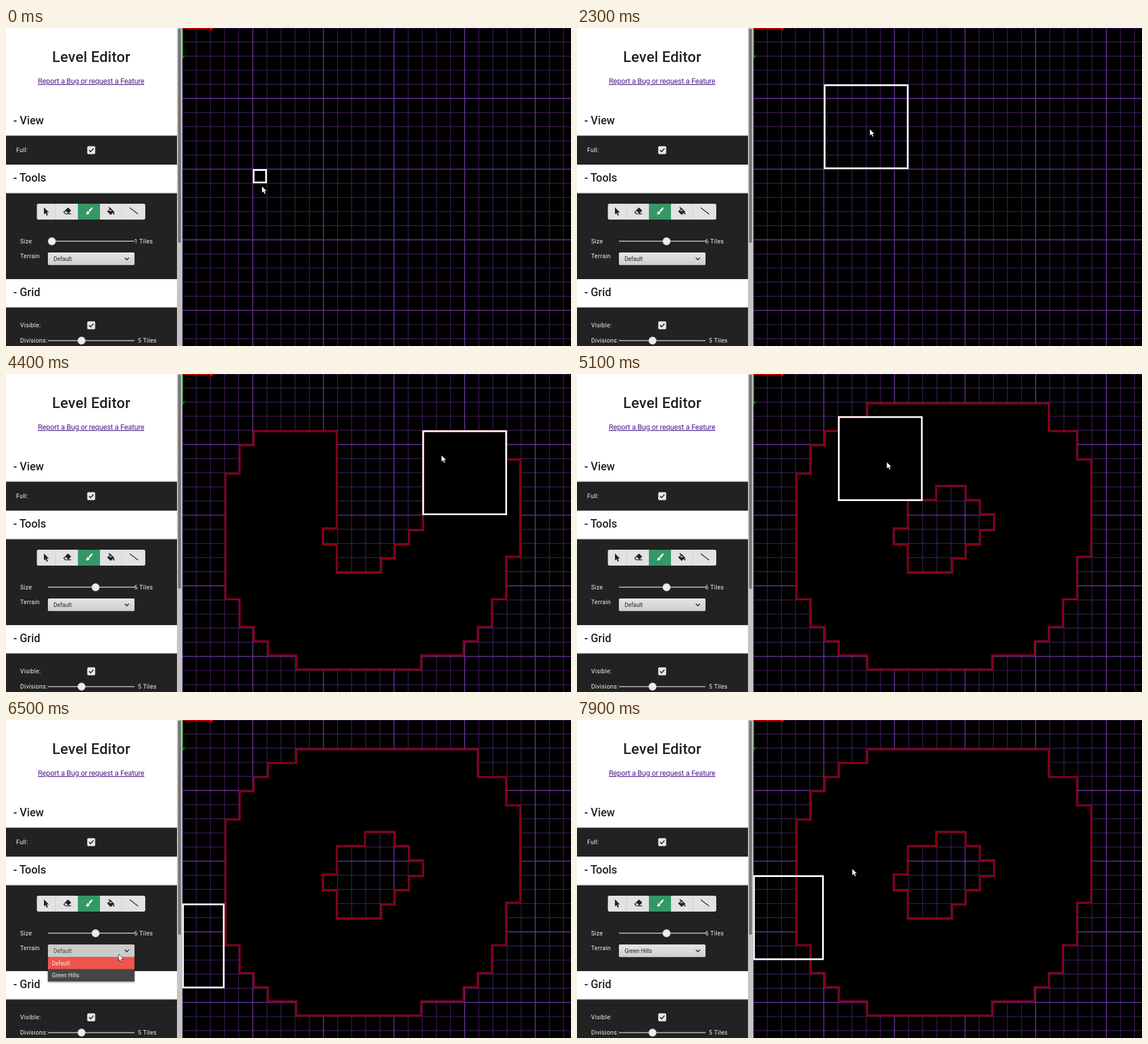
Recreate the animation shown at these times as an HTML page with a canvas. Size 998 by 561 pixels, loop 8000 ms.

```html
<!DOCTYPE html>
<html lang="en">
<head>
<meta charset="utf-8">
<title>Level Editor</title>
<style>
html, body { margin: 0; width: 100%; height: 100%; overflow: hidden; background: #000; }
canvas, svg { position: absolute; left: 0; top: 0; width: 998px; height: 561px; }
text { font-family: Roboto, sans-serif; fill: #222; }
.title { font-size: 26px; font-weight: 500; letter-spacing: .2px; text-anchor: middle; }
.link { font-size: 13px; letter-spacing: -.17px; text-anchor: middle; fill: #4c1788; text-decoration: underline; }
.head text { font-size: 19.5px; font-weight: 500; }
.label text { font-size: 10.5px; letter-spacing: .35px; fill: #f4f4f4; }
.small { font-size: 10px; }
.menu text { fill: #eee; }
.dark { fill: #222; }
.line { fill: none; stroke: #222; stroke-width: 1.7; }
.track { fill: #b4b4b4; }
.knob { fill: #ececec; stroke: #aaa; stroke-width: .6; }
</style>
</head>
<body>
<canvas id="stage" width="998" height="561"></canvas>
<svg viewBox="0 0 998 561">
  <defs>
    <linearGradient id="shade" x2="0" y2="1">
      <stop stop-color="#e6e6e6"/><stop offset="1" stop-color="#cdcdcd"/>
    </linearGradient>
    <linearGradient id="lit" x2="0" y2="1">
      <stop stop-color="#f0f0f0"/><stop offset="1" stop-color="#dadada"/>
    </linearGradient>
    <filter id="drop" x="-10%" y="-10%" width="120%" height="130%">
      <feDropShadow dx="0" dy="1.5" stdDeviation="1.8" flood-opacity=".5"/>
    </filter>
    <g id="box">
      <rect width="14" height="14" rx="2" fill="#e8e8e8"/>
      <path class="line" stroke-width="2" d="M3.2 6.8 6 9.7 11 4"/>
    </g>
  </defs>

  <rect width="302" height="561" fill="#fff"/>
  <rect x="302" width="9.5" height="561" fill="#c4c4c4"/>
  <rect x="304" y="1" width="5" height="378" rx="2.5" fill="#777"/>
  <path class="dark" d="M0 190H302V241H0ZM0 291H302V443H0ZM0 492H302V561H0Z"/>
  <rect id="gridHead" y="443" width="302" height="49" fill="#fff"/>
  <path d="M0 189.5H302M0 291H302M0 492.5H302" stroke="#ccc" stroke-width="1.5"/>

  <text class="title" x="150.5" y="59.5">Level Editor</text>
  <text class="link" x="150.3" y="98">Report a Bug or request a Feature</text>
  <g class="head">
    <text x="13" y="169.5">- View</text>
    <text x="13" y="271">- Tools</text>
    <text x="13" y="473">- Grid</text>
  </g>

  <g class="label">
    <text x="18" y="219">Full:</text>
    <text x="25" y="380">Size</text>
    <text x="25" y="406">Terrain</text>
    <text x="25" y="528">Visible:</text>
    <text x="25" y="555">Divisions:</text>
    <text x="233" y="555">5 Tiles</text>
    <text id="sizeText" x="226.5" y="380">1 Tiles</text>
  </g>
  <use href="#box" x="143.5" y="208.5"/>
  <use href="#box" x="143.5" y="517.5"/>

  <rect x="54.5" y="310" width="191.5" height="28" rx="3" fill="#e2e2e2"/>
  <rect x="127" y="310" width="39" height="28" fill="#349866"/>
  <path d="M87.5 310V338M204.5 310V338" stroke="#cfcfcf"/>
  <path class="dark" d="M67 316.5V328.8L69.8 326.4 71.9 331 74 330 72 325.6H75.8Z"/>
  <path class="dark" d="M101.5 324.5 108.5 317.5Q109.5 316.5 110.5 317.5L114.3 321.2Q115.2 322.2 114.3 323.2L110.2 327H115V328.5H105L101.5 325.8Z"/>
  <path d="M105.3 322.6 109.5 326.8 108.3 327.2H105.6L103.2 325Z" fill="#e2e2e2"/>
  <path d="M151.5 316.5Q153.6 316.4 152.8 318.4L148.3 324.6 145.6 322.3ZM144.8 323.1 147.4 325.5Q147.2 329.6 140.6 328.7 142.2 328 142.2 326 142.5 323.5 144.8 323.1Z" fill="#fff"/>
  <path class="line" d="M181.5 316.5 190 324 184.8 328.5 179.8 323.5 185.8 318.4"/>
  <path class="dark" d="M180 323H190L184.8 328.5ZM190.3 324.5Q193 329 190.3 329 188 329 190.3 324.5Z"/>
  <path class="line" style="stroke-width:1.4" d="M218.5 317 233.5 328.5"/>

  <rect class="track" x="74" y="375.2" width="153" height="1.8"/>
  <circle id="knob" class="knob" cx="81" cy="376.3" r="6.8"/>
  <rect class="track" x="74" y="550.6" width="153" height="1.8"/>
  <circle class="knob" cx="133.4" cy="551.5" r="6.8"/>

  <rect id="select" x="74" y="396" width="153" height="22.3" rx="2" fill="url(#shade)"/>
  <text id="choice" class="small" x="84" y="410.8">Default</text>
  <path class="line" style="stroke-width:1.5" d="M209.8 405.2 213.5 408.9 217.2 405.2"/>
  <g id="menu" class="menu" display="none">
    <rect x="74" y="418" width="153" height="43" fill="#444" filter="url(#drop)"/>
    <rect id="mark" x="74" y="418" width="153" height="21.5" fill="#f0544a"/>
    <text class="small" x="81" y="432.5">Default</text>
    <text class="small" x="81" y="454">Green Hills</text>
  </g>
  <path id="cursor" d="M0 0V12.2L2.8 9.7 4.8 14.2 7 13.2 5 8.9H8.7Z" fill="#fff" stroke="#000" stroke-width=".7"/>
</svg>

<script>
const $ = id => document.getElementById(id);
const stage = $('stage').getContext('2d');
const layer = document.createElement('canvas');
layer.width = 998;
layer.height = 561;
const land = layer.getContext('2d');

const TICK = 100, LOOP = 80, COLS = 28, ROWS = 23, DRAG = 30;
const X = c => 311.2 + 24.95 * c;
const Y = r => 24.93 * r - .3;

// Brush stamps (column,row) laid down in each tick of the drag
const drag = [
  '5,4 5,5 4,5', '4,6 3,7', '3,9 3,10', '4,11 4,12', '5,12 5,13 6,14', '7,14 8,15',
  '9,15 10,14', '10,15 11,15', '12,14 14,14', '14,13 15,13 15,12', '16,12 16,11',
  '17,10 17,8', '18,7', '18,6', '17,5 17,4', '16,4 15,3 15,2', '14,2 13,2',
  '12,2 11,2', '10,2 9,2', '8,2', '7,3', '6,3'
].map(s => s.split(' ').map(p => p.split(',').map(Number)));

// Brush moves without painting: tick, column, row
const hover = [
  [0, 5, 10], [1, 5, 11], [10, 3, 9], [19, 4, 8], [20, 5, 7], [21, 6, 6], [22, 6, 4], [23, 5, 4],
  [53, 5, 4], [54, 4, 5], [55, 3, 7], [56, 1, 8], [57, 0, 9], [58, -1, 11], [59, -2, 12],
  [60, -3, 13], [78, -2, 12], [79, -1, 11]
];

// Pointer rests: first tick, last tick, x, y
const rests = [
  [0, 0, 452, 279], [1, 1, 449, 284], [23, 29, 517, 178], [35, 35, 640, 437],
  [44, 44, 769, 143], [51, 52, 547, 155], [62, 68, 199, 413], [69, 69, 199, 422],
  [70, 70, 199, 434], [71, 71, 199, 445], [72, 77, 199, 451], [79, 79, 486, 262]
];

const sizeAt = n => Math.min(6, Math.max(1, n - 4));

function brushAt(n) {
  const size = sizeAt(n);
  if (n > 1 && n < 11) {
    const back = size - 1 >> 1;
    return [5 - back, 11 - back];
  }
  if (n >= DRAG && n < 53) return drag[Math.min(n - DRAG, drag.length - 1)].at(-1);
  return hover.findLast(h => h[0] <= n).slice(1);
}

function pointerAt(n) {
  const rest = rests.find(r => n >= r[0] && n <= r[1]);
  if (rest) return rest.slice(2);
  if (n < 19 || n > 59 && n < 78) return null;
  const [c, r] = brushAt(n + 1);
  return [X(c + 3.3), Y(r + 3.3)];
}

function drawGrid() {
  stage.fillStyle = '#000';
  stage.fillRect(0, 0, 998, 561);
  for (const major of [false, true]) {
    stage.strokeStyle = major ? '#663399' : '#3f2060';
    stage.lineWidth = major ? 1.6 : 1.2;
    stage.beginPath();
    for (let i = 0; i < COLS; i++) {
      if ((i % 5 === 0) !== major) continue;
      stage.moveTo(X(i), 0);
      stage.lineTo(X(i), 561);
      stage.moveTo(311, Y(i));
      stage.lineTo(998, Y(i));
    }
    stage.stroke();
  }
  stage.fillStyle = '#f00';
  stage.fill(new Path2D('M311 0H367L361 5.5V1.5H311Z'));
  stage.fillStyle = '#0a7a1a';
  stage.fill(new Path2D('M311 0H313V48.5H317L312 54.5H311Z'));
}

function drawLand(n) {
  const full = new Set();
  for (const [c, r] of drag.slice(0, Math.max(0, n - DRAG + 1)).flat())
    for (let i = 0; i < 36; i++) full.add((r + (i / 6 | 0)) * COLS + c + i % 6);
  land.clearRect(0, 0, 998, 561);
  if (!full.size) return;

  const eachCell = (filled, paint) => {
    for (let r = 0; r < ROWS; r++)
      for (let c = 0; c < COLS; c++)
        if (full.has(r * COLS + c) === filled) {
          const x = Math.round(X(c)), y = Math.round(Y(r));
          paint(x, y, Math.round(X(c + 1)) - x, Math.round(Y(r + 1)) - y);
        }
  };
  const rim = 3.5;
  land.fillStyle = '#000';
  eachCell(true, (x, y, w, h) => land.fillRect(x, y, w, h));
  land.fillStyle = '#850017';
  eachCell(false, (x, y, w, h) => land.fillRect(x - rim, y - rim, w + 2 * rim, h + 2 * rim));
  eachCell(false, (x, y, w, h) => land.clearRect(x, y, w, h));
  stage.drawImage(layer, 0, 0);
}

function drawBrush(n) {
  const [c, r] = brushAt(n), size = sizeAt(n);
  const x = X(Math.max(0, c)), y = Y(r);
  stage.strokeStyle = '#fff';
  stage.lineWidth = 3;
  stage.strokeRect(x + 1.5, y + 1.5, X(c + size) - x - 3, Y(r + size) - y - 3);
}

function drawPanel(n) {
  const size = sizeAt(n), open = n >= 65 && n < 75, pressed = n === 65 || n === 66;
  $('sizeText').textContent = size + ' Tiles';
  $('knob').setAttribute('cx', 81 + (size - 1) * 139 / 9);
  $('select').setAttribute('fill', pressed ? '#cbcbcb' : n >= 61 && n < 75 ? 'url(#lit)' : 'url(#shade)');
  $('choice').textContent = n < 75 ? 'Default' : 'Green Hills';
  $('choice').style.fill = pressed ? '#444' : '#222';
  $('menu').setAttribute('display', open ? 'inline' : 'none');
  $('mark').setAttribute('y', n < 70 ? 418 : 439.5);
  $('gridHead').setAttribute('fill', n === 75 || n === 78 ? '#f6f6f6' : n === 76 || n === 77 ? '#eee' : '#fff');
  const tip = pointerAt(n);
  $('cursor').setAttribute('display', tip ? 'inline' : 'none');
  if (tip) $('cursor').setAttribute('transform', `translate(${tip})`);
}

let last = -1;
function frame() {
  const n = Math.floor(performance.now() / TICK) % LOOP;
  if (n !== last) {
    last = n;
    drawGrid();
    drawLand(n);
    drawBrush(n);
    drawPanel(n);
  }
  requestAnimationFrame(frame);
}
frame();
</script>
</body>
</html>
```
